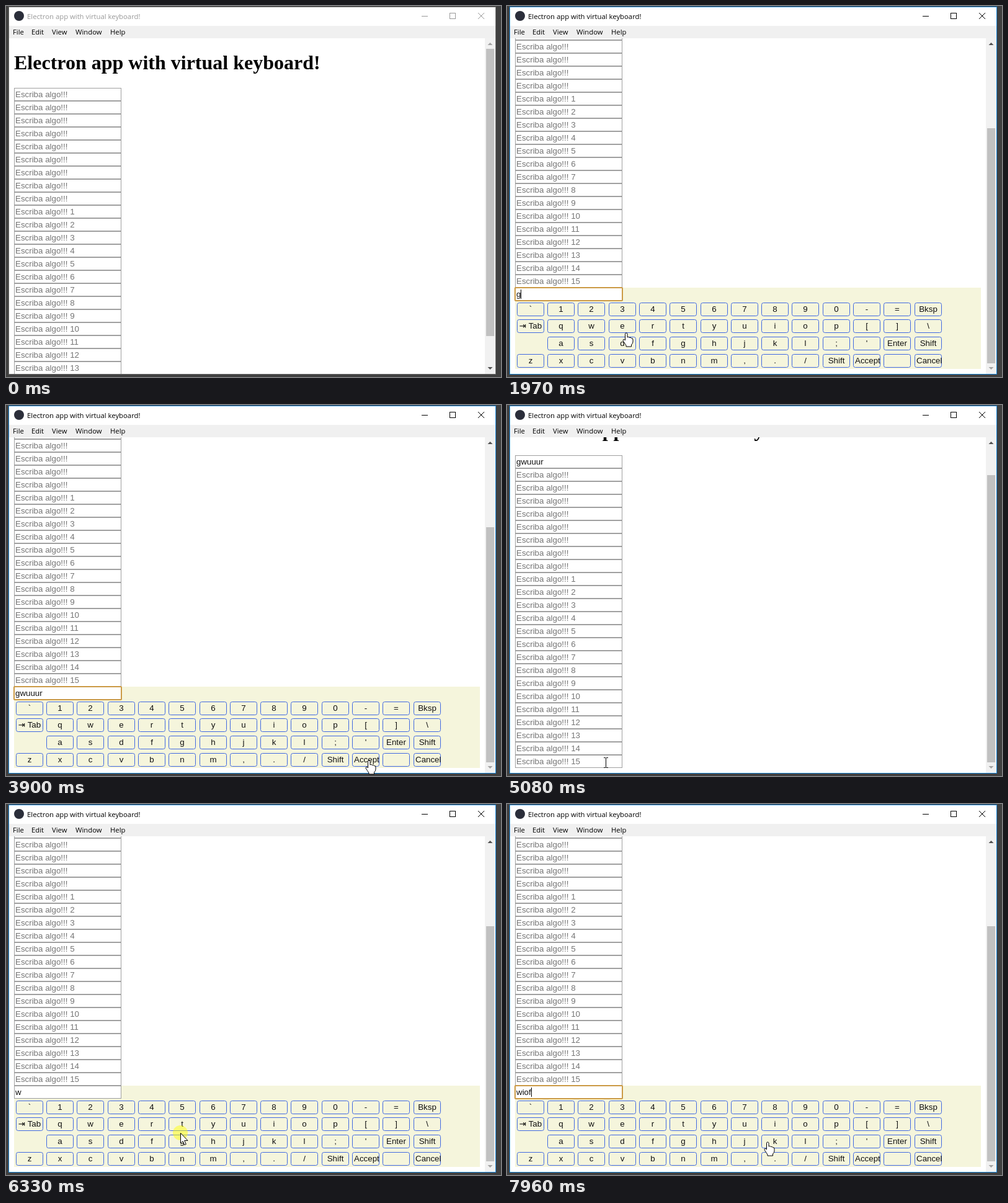
An HTML page with a canvas that plays this animation: 798 px wide and 598 px high, repeating every 8000 ms.

```html
<!DOCTYPE html>
<html lang="en">
<head>
<meta charset="utf-8">
<title>Electron app with virtual keyboard!</title>
<style>
  html, body { margin: 0; width: 100%; height: 100%; overflow: hidden; background: #404040; }
  canvas { display: block; }
</style>
</head>
<body>
<canvas id="stage" width="798" height="598"></canvas>
<script>
const ctx = document.getElementById('stage').getContext('2d', { alpha: false });

const LOOP = 8000;
const TITLE = 'Electron app with virtual keyboard!';
const UI_FONT = '11.3px "Open Sans", sans-serif';
const FORM_FONT = '13.333px "Liberation Sans", Arial, sans-serif';
const H1_FONT = 'bold 32px "Liberation Serif", serif';

const VIEW = { top: 52, height: 541 };
const FIELD = { x: 13, y: 132, w: 173, h: 21, count: 24 };
const BOARD = { y: 636, w: 751, h: 131 };
const KEY = { x: 15.75, y: 23.9, w: 44, h: 22, dx: 49.3, dy: 27.55 };
const PAGE_SCROLL = 51;

const KEY_ROWS = [
  '` 1 2 3 4 5 6 7 8 9 0 - = Bksp',
  '⇥_Tab q w e r t y u i o p [ ] \\',
  'none a s d f g h j k l ; \' Enter Shift',
  'z x c v b n m , . / Shift Accept _ Cancel'
].map(row => row.split(' '));

// When the mouse presses what: a key name or a point on the stage
const ENTRY = { time: 330, point: [520, 430] };
const PRESS = 80;
const SCRIPT = [
  [800, [133, 145]], [1710, 'g'], [2200, 'w'], [2600, 'u'], [2740, 'u'], [2900, 'u'],
  [3270, 'r'], [3980, 'Accept'], [4680, [187, 494], 'hover'], [5230, [159, 576]],
  [5930, 'w'], [6330, [281, 530]], [6960, 'i'], [7280, 'o'], [7650, 'f'], [8130, 'k']
];

const CURSORS = {
  arrow: new Path2D('M.5 .5V17L4 13.5L6.8 19.5L9.3 18.4L6.7 12.5H12Z'),
  hand: new Path2D('M-1.5 12V1.5Q-1.5 0 .2 0T2 1.5V7Q3.5 5.5 5.5 7.5Q7 6.5 8.5 8.5Q11 8 11 11V14Q11 17 8.5 19V22H0V20Q-2 17-5 12.5Q-5 10-3 10.5Z'),
  beam: new Path2D('M-3-7.5H0M1-7.5H4M.5-7V8M-3 8.5H0M1 8.5H4')
};

const clamp = (v, low, high) => Math.min(high, Math.max(low, v));

function rect(x, y, w, h, color) {
  ctx.fillStyle = color;
  ctx.fillRect(x, y, w, h);
}

function frame(x, y, w, h, color) {
  ctx.strokeStyle = color;
  ctx.lineWidth = 1;
  ctx.strokeRect(x + .5, y + .5, w - 1, h - 1);
}

function roundFrame(x, y, w, h, radius, width, color) {
  ctx.strokeStyle = color;
  ctx.lineWidth = width;
  ctx.beginPath();
  ctx.roundRect(x, y, w, h, radius);
  ctx.stroke();
}

function disc(x, y, r, color) {
  ctx.fillStyle = color;
  ctx.beginPath();
  ctx.arc(x, y, r, 0, 7);
  ctx.fill();
}

function label(text, x, y, font, color = '#000') {
  ctx.font = font;
  ctx.fillStyle = color;
  ctx.fillText(text, x, y);
}

function line(x1, y1, x2, y2, color) {
  ctx.strokeStyle = color;
  ctx.lineWidth = 1;
  ctx.beginPath();
  ctx.moveTo(x1, y1);
  ctx.lineTo(x2, y2);
  ctx.stroke();
}

function keyOrigin(row, col, top) {
  return [Math.round(KEY.x + col * KEY.dx), top + Math.round(KEY.y + row * KEY.dy)];
}

// The mouse points slightly right of a key's centre
function pointOf(target) {
  if (Array.isArray(target)) return target;
  const row = KEY_ROWS.findIndex(keys => keys.includes(target));
  const top = BOARD.y - PAGE_SCROLL - BOARD.h;
  const [x, y] = keyOrigin(row, KEY_ROWS[row].indexOf(target), top);
  return [x + KEY.w / 2 + 5, y + KEY.h / 2 + 1];
}

function hitTest([x, y], open, scroll) {
  const boardY = y + scroll - BOARD.y;
  if (open && boardY >= 0) {
    const col = (x - KEY.x) / KEY.dx, row = (boardY - KEY.y) / KEY.dy;
    const inside = col % 1 * KEY.dx < KEY.w && row % 1 * KEY.dy < KEY.h;
    const key = KEY_ROWS[Math.floor(row)]?.[Math.floor(col)];
    return inside && key && key !== 'none' ? { key } : {};
  }
  const field = Math.floor((y + scroll - FIELD.y) / FIELD.h);
  const inside = x >= FIELD.x && x < FIELD.x + FIELD.w && field >= 0 && field < FIELD.count;
  return inside ? { field } : {};
}

function stateAt(t) {
  const s = { active: false, open: false, focused: false, pressed: false, scroll: 0, text: '', field: 0, since: 0, openedAt: 0, values: {} };
  for (const [at, target, hover] of SCRIPT) {
    if (t < at) break;
    if (hover) continue;
    s.active = true;
    s.pressed = t < at + PRESS;
    s.focused = false;
    if (s.pressed) break;
    const { key, field } = hitTest(pointOf(target), s.open, s.scroll);
    s.since = at + PRESS;
    s.focused = key !== undefined || field !== undefined;
    if (field !== undefined) {
      Object.assign(s, { open: true, field, text: '', openedAt: s.since });
    } else if (key === 'Accept') {
      s.open = false;
      s.values[s.field] = s.text;
    } else {
      s.text += key || '';
    }
    s.scroll = PAGE_SCROLL + (s.open ? BOARD.h : 0);
  }
  return s;
}

// Arrive shortly before each press, leave shortly after it
function mouseAt(t) {
  let [x, y] = ENTRY.point, free = 0;
  for (const [at, target, hover] of SCRIPT) {
    const [toX, toY] = pointOf(target);
    const travel = Math.min(450, 4 * Math.hypot(toX - x, toY - y));
    const arrive = Math.max(at - 150, free + 1);
    const depart = Math.max(free, arrive - travel);
    if (t < arrive) {
      const k = clamp((t - depart) / (arrive - depart), 0, 1);
      return [Math.round(x + (toX - x) * k), Math.round(y + (toY - y) * k)];
    }
    [x, y] = [toX, toY];
    free = hover ? arrive : at + PRESS + 30;
  }
  return [x, y];
}

function cursorKind(point, s, t) {
  // The pointer shape follows a new keyboard only once the mouse has moved
  const stale = s.open && t < s.openedAt + 240;
  const { key, field } = hitTest(point, s.open && !stale, stale ? PAGE_SCROLL : s.scroll);
  return key ? 'hand' : field !== undefined ? 'beam' : 'arrow';
}

function placeholder(i) {
  return 'Escriba algo!!!' + (i > 8 ? ' ' + (i - 8) : '');
}

function drawField(y, value, hint) {
  rect(FIELD.x, y, FIELD.w, FIELD.h, '#fff');
  frame(FIELD.x, y, FIELD.w, FIELD.h, '#a0a0a0');
  label(value || hint, FIELD.x + 2, y + 15, FORM_FONT, value ? '#111' : '#757575');
}

function drawKey(name, row, col, top) {
  if (name === 'none') return;
  const [x, y] = keyOrigin(row, col, top);
  roundFrame(x + .5, y + .5, KEY.w - 1, KEY.h - 1, 3, 1, '#4169e1');
  const text = name.replace('_', ' ');
  ctx.font = FORM_FONT;
  const offset = Math.max(3, (KEY.w - ctx.measureText(text).width) / 2);
  label(text, x + offset, y + 15, FORM_FONT, '#111');
}

function drawBoard(s, t) {
  const top = BOARD.y - s.scroll;
  rect(FIELD.x, top, BOARD.w, BOARD.h, '#f5f5dc');
  KEY_ROWS.forEach((keys, row) => keys.forEach((name, col) => drawKey(name, row, col, top)));
  drawField(top, s.text, placeholder(s.field));
  if (!s.focused) return;
  roundFrame(FIELD.x, top, FIELD.w, FIELD.h, 1, 2, '#cb9a45');
  if ((t - s.since) % 1060 < 530) {
    ctx.font = FORM_FONT;
    rect(Math.round(FIELD.x + 2 + ctx.measureText(s.text).width), top + 3, 1, 15, '#000');
  }
}

function drawPage(s, t) {
  ctx.save();
  ctx.beginPath();
  ctx.rect(5, VIEW.top, 767, VIEW.height);
  ctx.clip();
  label(TITLE, FIELD.x, 102 - s.scroll, H1_FONT);
  for (let i = 0; i < FIELD.count; i++) {
    drawField(FIELD.y + i * FIELD.h - s.scroll, s.values[i], placeholder(i));
  }
  if (s.open) drawBoard(s, t);
  ctx.restore();
}

function drawScrollArrow(y, dir, enabled) {
  ctx.fillStyle = enabled ? '#505050' : '#a3a3a3';
  ctx.beginPath();
  ctx.moveTo(776.5, y - 2 * dir);
  ctx.lineTo(784.5, y - 2 * dir);
  ctx.lineTo(780.5, y + 2 * dir);
  ctx.fill();
}

function drawScrollbar(s) {
  const content = VIEW.height + PAGE_SCROLL + (s.open ? BOARD.h : 0);
  const scale = 507 / content;
  rect(772, VIEW.top, 17, VIEW.height, '#f1f1f1');
  rect(774, Math.round(69 + s.scroll * scale), 13, Math.round(VIEW.height * scale), '#c1c1c1');
  drawScrollArrow(61, -1, s.scroll > 0);
  drawScrollArrow(584, 1, s.scroll === 0);
}

function drawWindow(s) {
  const ink = s.active ? '#000' : '#999';
  rect(0, 0, 798, 598, '#404040');
  rect(4, 1, 786, 593, s.active ? '#1883d7' : '#6a6a6a');
  rect(5, 2, 784, 591, '#fff');
  rect(5, 32, 784, 20, '#f0f0f0');
  disc(21, 16, 8, '#2b2e3a');
  label(TITLE, 34, 21, UI_FONT, ink);
  [['File', 11], ['Edit', 41], ['View', 74], ['Window', 112], ['Help', 168]]
    .forEach(([name, x]) => label(name, x, 46, UI_FONT));
  line(670, 16.5, 680, 16.5, ink);
  frame(715, 11, 10, 10, ink);
  line(761, 11, 771, 21, ink);
  line(771, 11, 761, 21, ink);
}

function drawMouse(s, t) {
  if (t < ENTRY.time) return;
  const point = mouseAt(t);
  const kind = cursorKind(point, s, t);
  ctx.save();
  ctx.translate(...point);
  if (s.pressed) disc(0, 0, 12, 'rgba(255, 255, 0, .47)');
  ctx.fillStyle = '#fff';
  ctx.strokeStyle = '#000';
  ctx.lineWidth = 1;
  if (kind !== 'beam') ctx.fill(CURSORS[kind]);
  ctx.stroke(CURSORS[kind]);
  ctx.restore();
}

function draw() {
  const t = performance.now() % LOOP;
  const s = stateAt(t);
  drawWindow(s);
  drawPage(s, t);
  drawScrollbar(s);
  drawMouse(s, t);
  requestAnimationFrame(draw);
}
draw();
</script>
</body>
</html>
```
